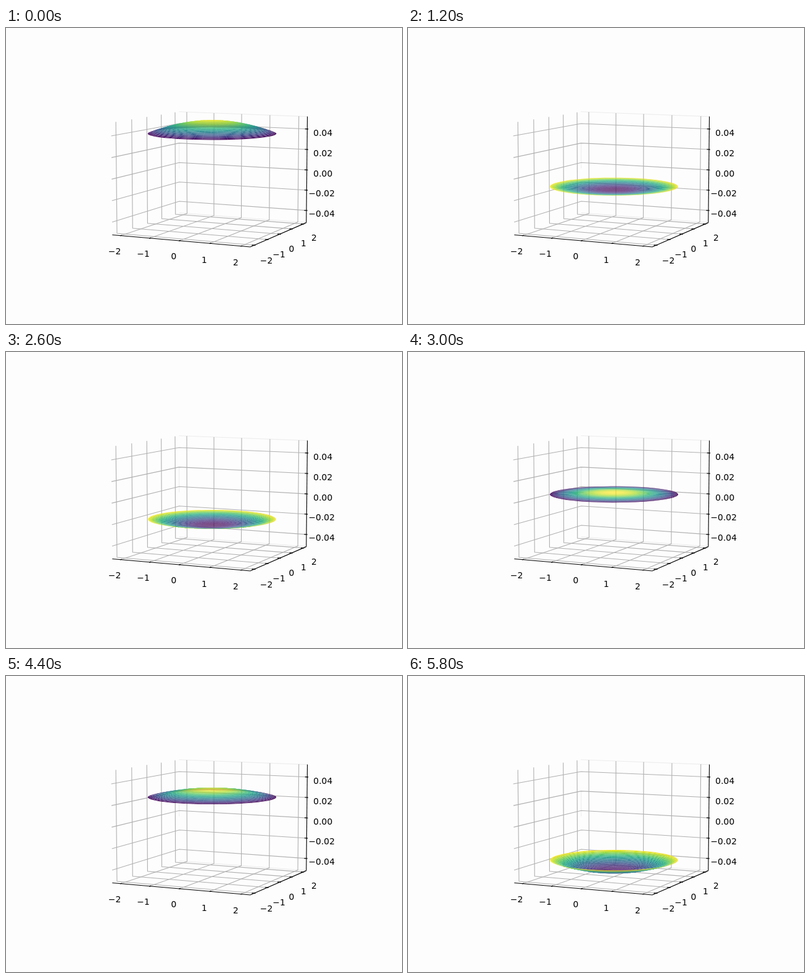
These frames come from a looping animation (642x480 px, 6 s). An HTML page with a canvas:

```html
<!DOCTYPE html>
<html lang="en">
<head>
<meta charset="utf-8">
<title>Vibrating membrane</title>
<style>
html, body { margin: 0; width: 100%; height: 100%; overflow: hidden; background: #fdfdfd; }
canvas { display: block; }
</style>
</head>
<body>
<canvas id="stage" width="642" height="480"></canvas>
<script>
const ctx = document.getElementById('stage').getContext('2d');
const RAD = Math.PI / 180;
const SIN_A = Math.sin(65 * RAD), COS_A = Math.cos(65 * RAD);
const SIN_E = Math.sin(7.5 * RAD), COS_E = Math.cos(7.5 * RAD);
const H = 0.5953, V = 0.4464;        // half width and half height of the box
const KX = 0.25974, KZ = 8.571;      // box units per data unit
const CELLS = 49, RADIUS = 2, STEP = 200, STEPS = 30;
const UNITS = [-2, -1, 0, 1, 2];

const VIRIDIS = [
  [68, 1, 84], [72, 40, 120], [62, 74, 137], [49, 104, 142], [38, 130, 142],
  [31, 158, 137], [53, 183, 121], [109, 205, 89], [180, 222, 44], [253, 231, 37]
];

// Perspective view: returns screen x, screen y and distance from the eye.
function project(x, y, z) {
  const near = COS_A * x - SIN_A * y;
  const dist = 10 - COS_E * near - SIN_E * z;
  const scale = 1997.8 / dist;
  return [
    334.05 + scale * (SIN_A * x + COS_A * y),
    237.4 - scale * (COS_E * z - SIN_E * near),
    dist
  ];
}

function trace(points) {
  ctx.beginPath();
  for (const p of points) ctx.lineTo(p[0], p[1]);
}

function line(color, ...corners) {
  trace(corners.map(c => project(...c)));
  ctx.strokeStyle = color;
  ctx.stroke();
}

function viridis(t) {
  const pos = Math.min(Math.max(t, 0), 1) * (VIRIDIS.length - 1);
  const i = Math.min(Math.floor(pos), VIRIDIS.length - 2);
  const mix = VIRIDIS[i].map((c, k) => Math.round(c + (VIRIDIS[i + 1][k] - c) * (pos - i)));
  return `rgb(${mix})`;
}

function bessel0(x) {
  const q = x * x / 4;
  return 1 - q + q * q / 4 - q * q * q / 36;
}

function drawGrid() {
  const faint = '#ededed', grid = '#b0b0b0';
  line(faint, [-H, H, V], [H, H, V]);
  line(faint, [-H, H, -V], [H, H, -V]);
  line(faint, [-H, H, 0.17], [-H, H, -0.05]);
  for (const u of UNITS) {
    const p = u * KX, z = u * 0.02 * KZ;
    line(grid, [p, -H, -V], [p, H, -V], [p, H, V]);
    line(grid, [H, p, -V], [-H, p, -V], [-H, p, V]);
    line(grid, [-H, -H, z], [-H, H, z], [H, H, z]);
  }
}

function drawAxes() {
  line('#000', [-H, -H, -V], [H, -H, -V]);
  line('#000', [H, -H, -V], [H, H, -V]);
  line('#000', [H, H, -V], [H, H, V]);
  const inner = H - 0.02, outer = H + 0.01;
  ctx.fillStyle = '#000';
  const label = (text, x, y) => ctx.fillText(String(text).replace('-', '\u2212'), x, y);
  const xLabels = [[176, 367], [222.5, 371], [272, 375], [321.5, 380.5], [372.5, 384.5]];
  const yLabels = [[422, 382], [442.5, 371.5], [463, 362.5], [482.5, 353.5], [499.5, 345]];
  UNITS.forEach((u, i) => {
    const p = u * KX, z = u * 0.02 * KZ;
    line('#000', [p, -inner, -V], [p, -outer, -V]);
    line('#000', [inner, p, -V], [outer, p, -V]);
    line('#000', [inner, H, z], [outer, H, z]);
    label(u, ...xLabels[i]);
    label(u, ...yLabels[i]);
    label((u * 0.02).toFixed(2), u < 0 ? 511.7 : 513.8, 240.5 - u * 32.8);
  });
}

function drawMembrane(n) {
  const rim = 0.0393 * Math.exp(-0.0033 * n) * Math.cos((18.83 * n - 6) * RAD);
  const centre = rim / bessel0(1);
  const rings = [];
  for (let i = 0; i <= CELLS; i++) {
    const r = RADIUS * i / CELLS;
    const z = centre * bessel0(r / 2);
    const points = [];
    for (let j = 0; j <= CELLS; j++) {
      const a = 2 * Math.PI * j / CELLS;
      points.push(project(r * KX * Math.cos(a), r * KX * Math.sin(a), z * KZ));
    }
    rings.push({ z, points });
  }
  const low = Math.min(centre, rim), span = Math.abs(centre - rim);
  const cells = [];
  for (let i = 0; i < CELLS; i++) {
    const a = rings[i], b = rings[i + 1];
    const color = viridis(((a.z + b.z) / 2 - low) / span);
    for (let j = 0; j < CELLS; j++) {
      const quad = [a.points[j], a.points[j + 1], b.points[j + 1], b.points[j]];
      cells.push({ quad, color, dist: quad.reduce((sum, p) => sum + p[2], 0) });
    }
  }
  cells.sort((a, b) => b.dist - a.dist);
  for (const { quad, color } of cells) {
    trace(quad);
    ctx.fillStyle = color;
    ctx.fill();
  }
}

let shown = -1;
const start = performance.now();

function draw() {
  const n = Math.floor(Math.max(0, performance.now() - start) / STEP) % STEPS;
  if (n !== shown) {
    shown = n;
    ctx.fillStyle = '#fdfdfd';
    ctx.fillRect(0, 0, 642, 480);
    ctx.lineWidth = 1.11;
    ctx.font = '13.89px "DejaVu Sans", sans-serif';
    ctx.textAlign = 'center';
    drawGrid();
    drawAxes();
    drawMembrane(n);
  }
  requestAnimationFrame(draw);
}
draw();
</script>
</body>
</html>
```
